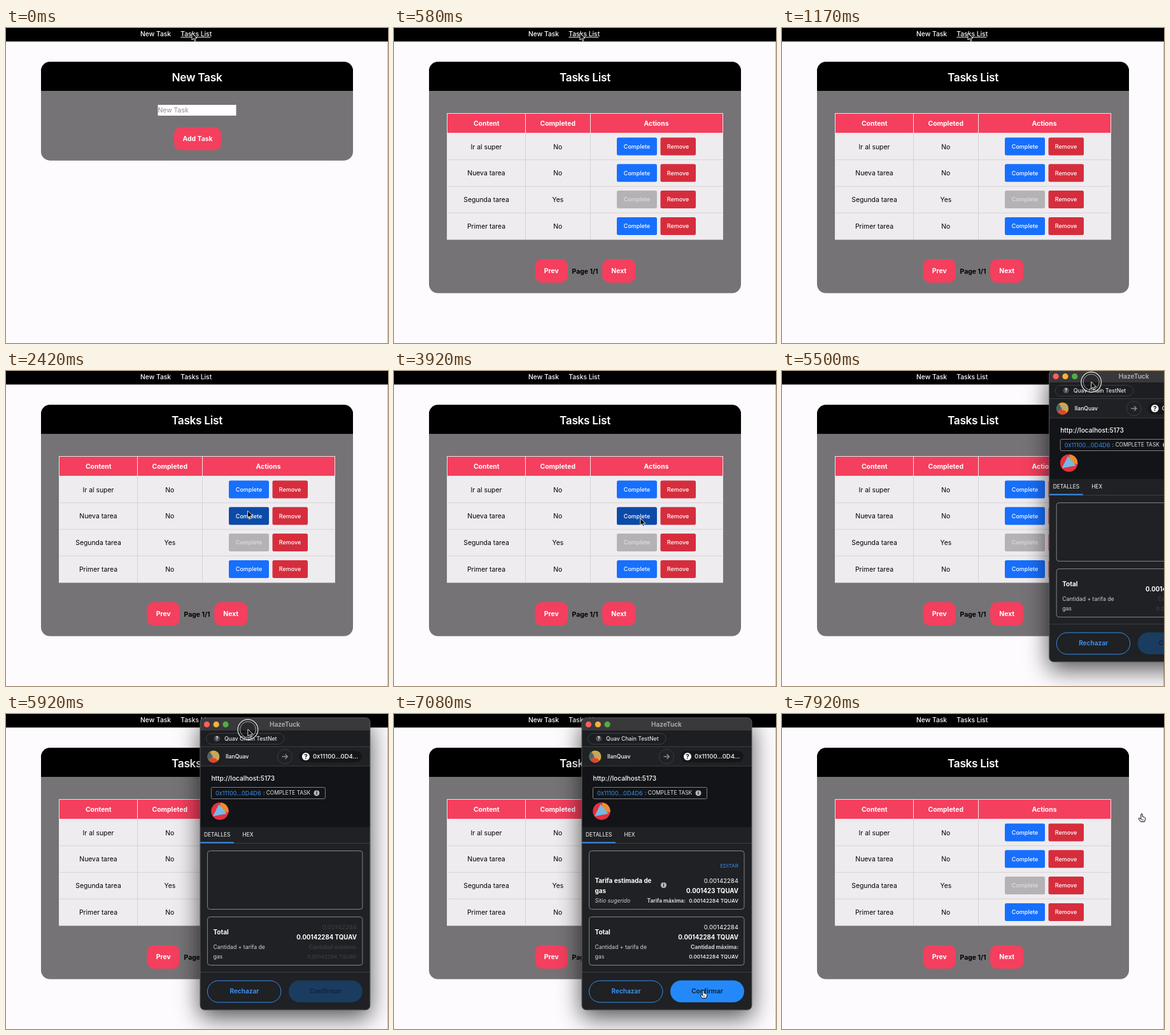
An HTML page that plays this animation: 600 px wide and 496 px high, repeating every 8000 ms.

```html
<!DOCTYPE html>
<html lang="en">
<head>
<meta charset="utf-8">
<title>Tasks</title>
<style>
html, body { margin: 0; width: 100%; height: 100%; overflow: hidden; background: #fdfbfe }
svg { display: block; width: 600px; height: 496px }
text { font-family: Inter, "Open Sans", sans-serif; white-space: pre }
.m { text-anchor: middle }
.e { text-anchor: end }
.b { font-weight: 700 }
.s { font-weight: 500 }
.h { font-weight: 600; letter-spacing: -.3px }
#wallet { filter: drop-shadow(0 12px 18px #000a) }
</style>
</head>
<body>
<svg id="stage" viewBox="0 0 600 496"></svg>
<script>
const PINK = '#f43f5e', BLUE = '#176ffd', GREY = '#757376', LINK = '#3b8eea', LINE = '#3b3e43';

const rect = (x, y, w, h, fill, r = 0, more = '') =>
  `<rect x="${x}" y="${y}" width="${w}" height="${h}" rx="${r}" fill="${fill}" ${more}/>`;
const frame = (x, y, w, h, color, r) => rect(x, y, w, h, 'none', r, `stroke="${color}"`);
const disc = (x, y, r, fill, more = '') => `<circle cx="${x}" cy="${y}" r="${r}" fill="${fill}" ${more}/>`;
const path = (d, fill, more = '') => `<path d="${d}" fill="${fill}" ${more}/>`;
const text = (x, y, str, size, fill, cls = '', more = '') =>
  `<text x="${x}" y="${y}" font-size="${size}" fill="${fill}" class="${cls}" ${more}>${str}</text>`;
const group = (id, body) => `<g id="${id}">${body}</g>`;
const pinkButton = (x, y, w, h, str) =>
  rect(x, y, w, h, PINK, 11) + text(x + w / 2, y + 22, str, 10.4, '#fff', 'm b');
const badge = (x, y, r, fill, ink, mark) =>
  disc(x, y, r, fill) + text(x, y + r * .6, mark, r * 1.65, ink, 'm b');

function newTask() {
  return text(300, 84, 'New Task', 17.3, '#fff', 'm h') +
    rect(238.5, 121, 123, 17, '#fff') + text(238.5, 133.4, 'New Task', 10.4, '#8d8b8f') +
    pinkButton(264, 156, 74, 36.5, 'Add Task');
}

function table() {
  const rows = [['Ir al super', 'No'], ['Nueva tarea', 'No'], ['Segunda tarea', 'Yes'], ['Primer tarea', 'No']];
  let s = rect(84, 134, 432, 199, '#efecef') + rect(84, 134, 432, 31.5, PINK);
  [['Content', 145.3], ['Completed', 257.3], ['Actions', 412]].forEach(([name, x]) =>
    s += text(x, 154, name, 10.4, '#fff', 'm b'));
  rows.forEach(([name, done], i) => {
    const y = 165.5 + i * 41.8, off = done === 'Yes';
    s += text(145, y + 25, name, 10.4, '#000', 'm') + text(257.3, y + 25, done, 10.4, '#000', 'm');
    s += rect(350, y + 7, 63, 28, off ? '#b4b2b5' : BLUE, 2.5, `id="done${i}"`);
    s += text(381.5, y + 24.3, 'Complete', 9, off ? '#dfdde0' : '#fff', 'm s');
    s += rect(418.5, y + 7, 55.5, 28, '#d62d3d', 2.5) + text(446, y + 24.3, 'Remove', 9, '#fff', 'm s');
    if (i) s += rect(84, y - .3, 432, 1, '#d5d2d5');
  });
  s += path('M206.5 165.5V333M308.5 165.5V333', 'none', 'stroke="#d5d2d5"');
  s += path('M84 165.5H516M206.5 134.5V165.5M308.5 134.5V165.5', 'none', 'stroke="#f6e4e8"');
  s += frame(83.5, 134.5, 433, 198.5, '#e9e3e8', 0);
  return s + pinkButton(221.5, 364, 51.5, 37, 'Prev') + pinkButton(327, 364, 52.5, 37, 'Next') +
    text(300, 386.5, 'Page 1/1', 10.4, '#000', 'm b');
}

function wallet() {
  const W = '#fff', SOFT = '#d0d3d6', coin = 'TQUAV', amount = '0.00142284', R = 541;
  let s = rect(295, 6, 267, 460, '#1f2124') + rect(295, 6, 267, 20, '#39383b') + rect(295, 26, 267, 25, '#1c1e21');
  ['#f9605a', '#f3b13e', '#4fae45'].forEach((c, i) => s += disc(305.5 + i * 14.8, 16.4, 4.6, c));
  s += text(428, 19.6, 'HazeTuck', 10, '#a8a7aa', 'm b');

  s += frame(304.5, 30.5, 122.5, 17, LINE, 8.5) + badge(321.5, 38.7, 4.6, '#4b4f55', W, '?') +
    text(333, 42, 'Quav Chain TestNet', 8.7, '#e4e5e7', 's');
  s += disc(316, 67, 9.5, '#e9a227') + path('M316 67L310 59.6A9.5 9.5 0 0 0 308 72.2Z', '#46666b') +
    path('M316 67L308 72.2A9.5 9.5 0 0 0 323 73.4Z', '#e2452f') +
    path('M312 62L322 59.7 325 68 316 70Z', '#b9a86a');
  s += text(335, 70, 'IlanQuav', 8.7, W, 's');
  s += disc(428, 67, 11.5, 'none', `stroke="${LINE}"`) +
    path('M423.5 67H432M428.5 63.3L432.2 67 428.5 70.7', 'none', 'stroke="#8a8f95" stroke-width="1.3"');
  s += rect(450, 58, 99, 18, '#141618', 9) + badge(461, 67, 6, W, '#141618', '?') +
    text(472, 70.4, '0x11100...0D4...', 9.5, W, 's');

  s += rect(295, 82, 267, 96, '#121417') + text(312.5, 104.5, 'http://localhost:5173', 10.2, W, 's');
  s += frame(312.5, 115.5, 179, 18, '#7d8289', 2) + text(319, 127.6, '0x11100...0D4D6', 9.2, LINK) +
    text(394, 127.4, ': COMPLETE TASK', 8.4, '#e4e5e7') + badge(478, 124.5, 4.5, '#b4b8bd', '#121417', 'i');
  s += disc(326, 153, 13.7, '#e5303f') + path('M327 139.4A13.7 13.7 0 0 1 339.5 155L326 152Z', '#ee8b2d') +
    path('M315 161L324.5 142 337 157Z', '#76b9e3');

  s += text(301, 193, 'DETALLES', 8.4, W) + text(361.5, 193, 'HEX', 8.4, W);
  s += path('M295 51.5H562M295 82H562M295 203.5H562M295 406.5H562', 'none', `stroke="${LINE}"`);
  s += rect(295, 201.5, 53, 2, LINK);
  s += frame(306.5, 215.5, 243.5, 92, '#80858c', 4) + frame(306.5, 319.5, 243.5, 76, '#80858c', 4);

  s += group('fee',
    text(R, 241.6, 'EDITAR', 8.2, LINK, 'e') + text(R, 265.6, amount, 9.6, W, 'e') +
    text(315.5, 265.6, 'Tarifa estimada de', 9.9, W, 'b') + text(315.5, 281.8, 'gas', 9.9, W, 'b') +
    badge(423.5, 269.5, 4.5, '#b4b8bd', '#1f2124', 'i') + text(R, 282.2, '0.001423 ' + coin, 9.7, W, 'e b') +
    text(315.5, 297, 'Sitio sugerido', 8.6, SOFT, '', 'font-style="italic"') +
    text(458, 297, 'Tarifa máxima:', 8.4, SOFT, 'e b') + text(R, 297, amount + ' ' + coin, 8.2, W, 'e s'));
  s += text(315.5, 347, 'Total', 10, W, 'b') + text(R, 355, amount + ' ' + coin, 9.7, W, 'e b') +
    text(315.5, 370, 'Cantidad + tarifa de', 8.7, SOFT) + text(315.5, 384.5, 'gas', 8.7, SOFT);
  s += group('total', text(R, 339, amount, 9.6, W, 'e') +
    text(R, 370, 'Cantidad máxima:', 8.5, SOFT, 'e b') + text(R, 385, amount + ' ' + coin, 8.2, W, 'e s'));

  s += frame(306.5, 420, 115.5, 34, LINK, 17) + text(364.5, 440, 'Rechazar', 10, LINK, 'm b');
  s += rect(434, 419.5, 116, 34.5, '#1a3c60', 17.2, 'id="confirm"') + text(492, 440, 'Confirmar', 10, '#14253b', 'm b');
  return `<g clip-path="url(#win)">${s}</g>` + frame(295, 6, 267, 460, '#5b5a5e', 7);
}

stage.innerHTML = `<clipPath id="win">${rect(295, 6, 267, 460, '#000', 7)}</clipPath>` +
  rect(0, 0, 600, 496, '#fdfbfe') + rect(599, 21, 1, 475, '#bcc0bc') + rect(0, 0, 600, 21.3, '#000') +
  text(211, 12.7, 'New Task', 10.3, '#fff', 's') + text(274.3, 12.7, 'Tasks List', 10.3, '#fff', 's') +
  rect(274.3, 14, 47, .9, '#fff', 0, 'id="under"') +
  rect(55, 53.3, 490, 155, GREY, 14, 'id="card"') +
  path('M55 99V67.3a14 14 0 0 1 14-14H531a14 14 0 0 1 14 14V99Z', '#000') +
  group('form', newTask()) +
  group('list', text(300, 84, 'Tasks List', 17.3, '#fff', 'm h') + group('rows', table())) +
  group('wallet', wallet()) +
  group('pointer',
    group('ring', disc(0, .5, 15.8, '#0004', 'stroke="#eee" stroke-width="1.2"') +
      disc(0, .5, 12.5, 'none', 'stroke="#aaa" stroke-width="1"')) +
    group('arrow', path('M0 0V11l2.6-2.4 1.7 4 1.8-.8-1.7-3.8h3.6z', '#000', 'stroke="#fff" stroke-width=".9"')) +
    group('hand', path('M-1.2.8Q0-1 1.2.8V4.6L4.6 5.6Q6 6.2 5.6 8.4L4.4 12.6H-1.6L-5 8Q-4.6 6.2-2.8 7.2L-1.2 8.6Z',
      '#fff', 'stroke="#000" stroke-width="1"') + path('M.2 8V11M2.2 8V11', 'none', 'stroke="#000" stroke-width=".6"')));

// [time, x, y]
const POINTER = [[1420, 292, 8], [2170, 368, 200], [2750, 387, 232], [3920, 387, 232], [4640, 543, 160],
  [5000, 543, 160], [5420, 525, 18], [5500, 486, 17], [5920, 380, 24], [6120, 370, 24],
  [6250, 370, 24], [6950, 486, 435], [7400, 486, 435], [7830, 549, 180], [7920, 565, 157]];
const WINDOW = [[5420, 165, -9], [5500, 125, -8], [5920, 10, 0], [6120, 0, 0]];

const clamp = v => Math.max(0, Math.min(1, v));

// Smooth curve through the keys that never overshoots them and rests where they repeat.
function along(keys, t) {
  const last = keys.length - 1;
  if (t <= keys[0][0]) return keys[0].slice(1);
  if (t >= keys[last][0]) return keys[last].slice(1);
  const i = keys.findIndex(k => k[0] > t) - 1, h = keys[i + 1][0] - keys[i][0], p = (t - keys[i][0]) / h;
  return [1, 2].map(c => {
    const slope = j => (keys[j + 1][c] - keys[j][c]) / (keys[j + 1][0] - keys[j][0]);
    const speed = j => {
      if (j === 0 || j === last) return 0;
      const a = slope(j - 1), b = slope(j);
      return a * b > 0 ? 2 * a * b / (a + b) : 0;
    };
    const q = 1 - p, v0 = keys[i][c], v1 = keys[i + 1][c];
    return v0 + (v1 - v0) * p * p * (3 - 2 * p) + h * p * q * (speed(i) * q - speed(i + 1) * p);
  });
}

const el = id => document.getElementById(id);
const show = (id, on) => el(id).style.display = on ? '' : 'none';
const move = (id, [x, y]) => el(id).setAttribute('transform', `translate(${x} ${y})`);

function draw(t) {
  const [x, y] = along(POINTER, t);
  const loaded = clamp((t - 6200) / 150), hand = t >= 6850;
  show('form', t < 80);
  show('list', t >= 80);
  show('rows', t >= 580);
  el('card').setAttribute('height', t < 80 ? 155.4 : t < 580 ? 97 : 364.2);
  show('under', y < 16 && t < 2000);
  el('done1').setAttribute('fill', x > 350 && x < 413 && y > 214 && y < 243 && t < 5000 ? '#0c4aa8' : BLUE);
  show('wallet', t >= 5420 && t < 7920);
  move('wallet', along(WINDOW, t));
  el('fee').setAttribute('opacity', loaded);
  el('total').setAttribute('opacity', .13 + .87 * loaded);
  el('confirm').setAttribute('fill', loaded < 1 || t > 7400 ? '#1a3c60' : '#2389fb');
  move('pointer', [x, y]);
  show('ring', t >= 5420 && t < 6150 || t >= 7250 && t < 7400);
  show('arrow', !hand);
  show('hand', hand);
}

function tick() {
  draw(performance.now() % 8000);
  requestAnimationFrame(tick);
}
tick();
</script>
</body>
</html>
```
